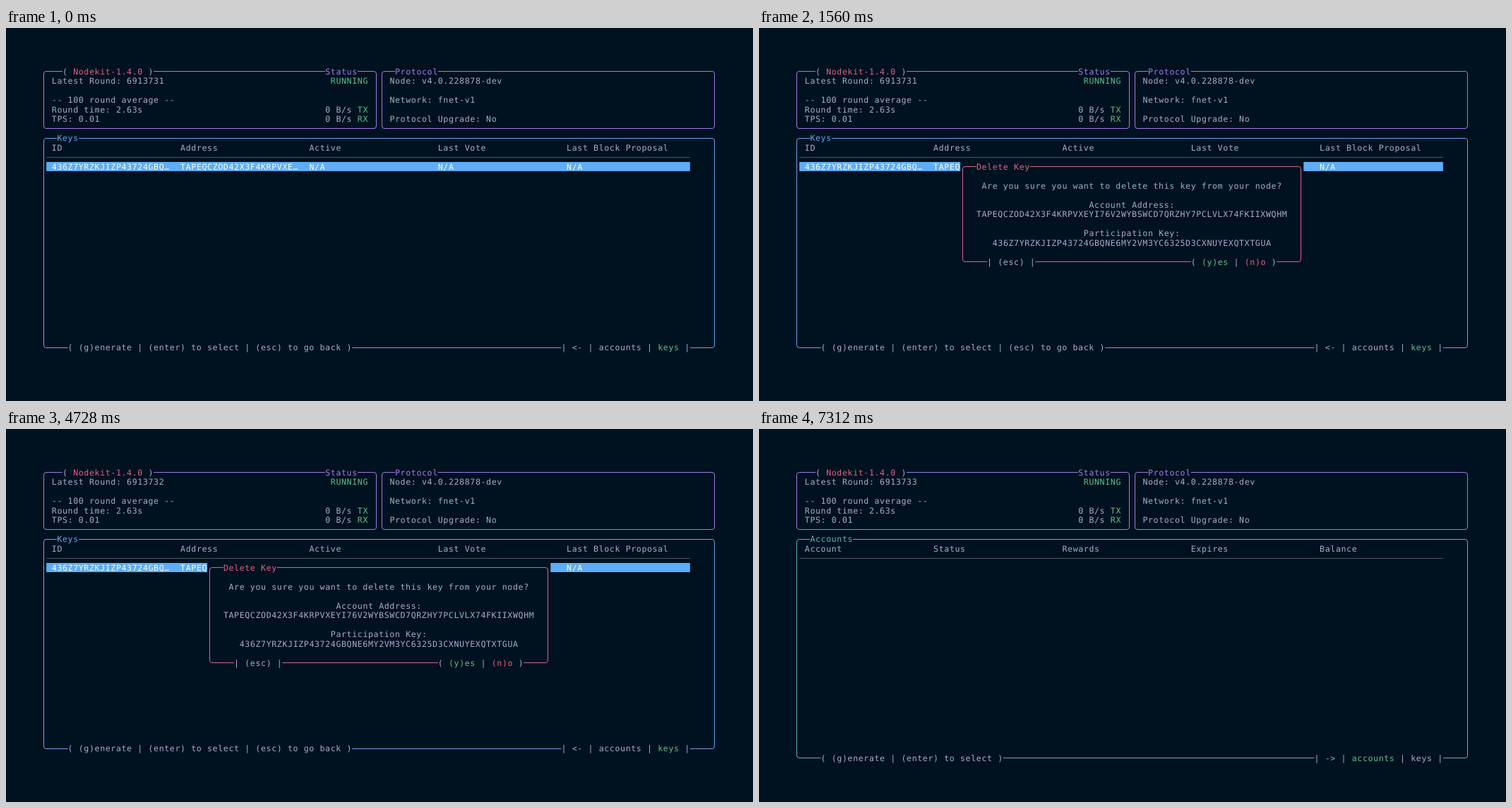
These frames come from a looping animation (1058 by 529 pixels, 7920 ms). An HTML page:

```html
<!DOCTYPE html>
<html lang="en">
<head>
<meta charset="utf-8">
<title>Terminal: delete a key</title>
<style>
  html, body { margin: 0; width: 100%; height: 100%; overflow: hidden; background: #001220; }
  svg { display: block; }
  text {
    font: 11.63px "DejaVu Sans Mono", monospace;
    letter-spacing: .595px;
    white-space: pre;
    text-rendering: geometricPrecision;
  }
</style>
</head>
<body>
<svg id="stage" width="1058" height="529" viewBox="0 0 1058 529"></svg>
<script>
(() => {
const LOOP = 7920;
const CELL = { w: 7.597, h: 13.5, x: 49.6, y: 54.75 };
const C = {
  bg: '#001220', text: '#a9abcb', red: '#e06088', green: '#5fc08a', purple: '#a27ce4',
  blue: '#64a5ee', cyan: '#56b6b8', yellow: '#f0d494', indigo: '#5f5fd7',
  rule: '#55565f', select: '#ffffd7', blueBar: '#5eadf8', cyanBar: '#54bdbb'
};
const ACCOUNT = 'TAPEQCZOD42X3F4KRPVXEYI76V2WYBSWCD7QRZHY7PCLVLX74FKIIXWQHM';
const KEY_ID = '436Z7YRZKJIZP43724GBQNE6MY2VM3YC6325D3CXNUYEXQTXTGUA';
const COLUMNS = [2, 26, 50, 74, 98];

const px = col => CELL.x + col * CELL.w;
const py = row => CELL.y + row * CELL.h;
const midX = col => Math.floor(px(col + .5)) + .5;
const midY = row => Math.floor(py(row + .5)) + .5;
const cut = s => s.slice(0, 21) + '…';

function add(parent, tag, attrs = {}) {
  const el = document.createElementNS('http://www.w3.org/2000/svg', tag);
  for (const k in attrs) el.setAttribute(k, attrs[k]);
  parent.append(el);
  return el;
}

function fillCells(g, col, row, cols, rows, fill) {
  const y = Math.round(py(row));
  add(g, 'rect', { x: px(col), y, width: cols * CELL.w, height: Math.round(py(row + rows)) - y, fill });
}

// Writes alternating text and colour arguments from one cell onwards.
function write(g, col, row, ...parts) {
  let last;
  for (let i = 0; i < parts.length; i += 2) {
    const s = parts[i];
    last = add(g, 'text', { x: px(col), y: py(row) + 10.8, fill: parts[i + 1] || C.text });
    last.textContent = s;
    col += s.length;
  }
  return last;
}

function box(g, left, top, right, bottom, stroke) {
  const x = midX(left), y = midY(top);
  fillCells(g, left, top, right - left + 1, bottom - top + 1, C.bg);
  add(g, 'rect', { x, y, width: midX(right) - x, height: midY(bottom) - y, rx: 3.5, fill: 'none', stroke });
}

// A label that interrupts a border.
function label(g, col, row, ...parts) {
  const len = parts.reduce((n, s, i) => i % 2 ? n : n + s.length, 0);
  fillCells(g, col, row, len, 1, C.bg);
  write(g, col, row, ...parts);
}

function table(g, title, bottom, color, heads, cells, barColor) {
  box(g, 0, 7, 125, bottom, color);
  label(g, 3, 7, title, color);
  heads.forEach((s, i) => write(g, COLUMNS[i], 8, s));
  add(g, 'path', { d: `M${px(1)} ${midY(9)}H${px(121)}`, stroke: C.rule });
  const row = add(g, 'g');
  fillCells(row, 1, 10, 120, 1, barColor);
  cells.forEach((s, i) => write(row, COLUMNS[i], 10, s, C.select));
  return row;
}

const stage = document.getElementById('stage');
const layer = () => add(stage, 'g');
add(stage, 'rect', { width: 1058, height: 529, fill: C.bg });

const header = layer();
box(header, 0, 0, 62, 6, C.purple);
label(header, 4, 0, '( ', '', 'Nodekit-1.4.0', C.red, ' )', '');
label(header, 53, 0, 'Status', C.purple);
const round = write(header, 2, 1, 'Latest Round: 6913731');
write(header, 54, 1, 'RUNNING', C.green);
write(header, 2, 3, '-- 100 round average --');
write(header, 2, 4, 'Round time: 2.63s');
write(header, 2, 5, 'TPS: 0.01');
write(header, 53, 4, '0 B/s ', '', 'TX', C.green);
write(header, 53, 5, '0 B/s ', '', 'RX', C.green);
box(header, 63, 0, 125, 6, C.purple);
label(header, 66, 0, 'Protocol', C.purple);
write(header, 65, 1, 'Node: v4.0.228878-dev');
write(header, 65, 3, 'Network: fnet-v1');
write(header, 65, 5, 'Protocol Upgrade: No');

const keys = layer();
table(keys, 'Keys', 29, C.blue,
  ['ID', 'Address', 'Active', 'Last Vote', 'Last Block Proposal'],
  [cut(KEY_ID), cut(ACCOUNT), 'N/A', 'N/A', 'N/A'], C.blueBar);
label(keys, 5, 29, '( (g)enerate | (enter) to select | (esc) to go back )', '');
label(keys, 97, 29, '| <- | accounts | ', '', 'keys', C.green, ' |', '');

const accounts = layer();
const accountRow = table(accounts, 'Accounts', 30, C.cyan,
  ['Account', 'Status', 'Rewards', 'Expires', 'Balance'],
  [cut(ACCOUNT), 'IDLE', '', 'N/A', '199999'], C.cyanBar);
label(accounts, 5, 30, '( (g)enerate | (enter) to select )', '');
label(accounts, 97, 30, '| -> | ', '', 'accounts', C.green, ' | keys |', '');

const info = layer();
box(info, 9, 8, 117, 21, C.yellow);
label(info, 12, 8, 'Key Information', C.yellow);
write(info, 11, 10, 'Account: ' + ACCOUNT);
write(info, 11, 11, 'Participation ID: ' + KEY_ID);
write(info, 11, 13, 'Vote Key: ', C.yellow, 'JotIYvp1QbqGs6Kq9CGfBggXbn+FfWZBuHMFdMLsZiA=', '');
write(info, 11, 14, 'Selection Key: ', C.yellow, '3N6F9DIYnMGvwuipTY3rCT35N9Ty5vQYbWqdtfUXVOY=', '');
write(info, 11, 15, 'State Proof Key: ', C.yellow,
  'idFCWA5Zi9XJhE7wiA5CPwVcaNWsq0t8kyb6S8XWU8dExDbJzPJn1vgUDx66lHVYWSyRdWqdk52OHXnYc8BT+w==', '');
write(info, 11, 17, 'Vote First Valid: ', C.indigo, '6913707', '');
write(info, 11, 18, 'Vote Last Valid: ', C.indigo, '6979410', '');
write(info, 11, 19, 'Vote Key Dilution: ', C.indigo, '257', '');
label(info, 14, 21, '| ', '', '(esc) to close', C.red, ' |', '');
label(info, 81, 21, '( ', '', '(d)elete', C.red, ' | ', '', '(r)egister online', C.green, ' )', '');

const dialog = layer();
box(dialog, 31, 10, 94, 20, C.red);
label(dialog, 34, 10, 'Delete Key', C.red);
write(dialog, 35, 12, 'Are you sure you want to delete this key from your node?');
write(dialog, 55, 14, 'Account Address:');
write(dialog, 34, 15, ACCOUNT);
write(dialog, 54, 17, 'Participation Key:');
write(dialog, 37, 18, KEY_ID);
label(dialog, 36, 20, '| (esc) |', '');
label(dialog, 74, 20, '( ', '', '(y)es', C.green, ' | ', '', '(n)o', C.red, ' )', '');

// Start and end of each part's visible time, in ms.
const SHOWN = [
  [keys, 0, 6360], [info, 1520, 1560], [dialog, 1560, 6360],
  [accounts, 6360, LOOP], [accountRow, 6360, 6400]
];

function draw() {
  const t = performance.now() % LOOP;
  for (const [el, from, to] of SHOWN) el.style.display = t >= from && t < to ? '' : 'none';
  round.textContent = 'Latest Round: ' + (6913731 + (t >= 2280) + (t >= 6400));
  requestAnimationFrame(draw);
}
draw();
})();
</script>
</body>
</html>
```
